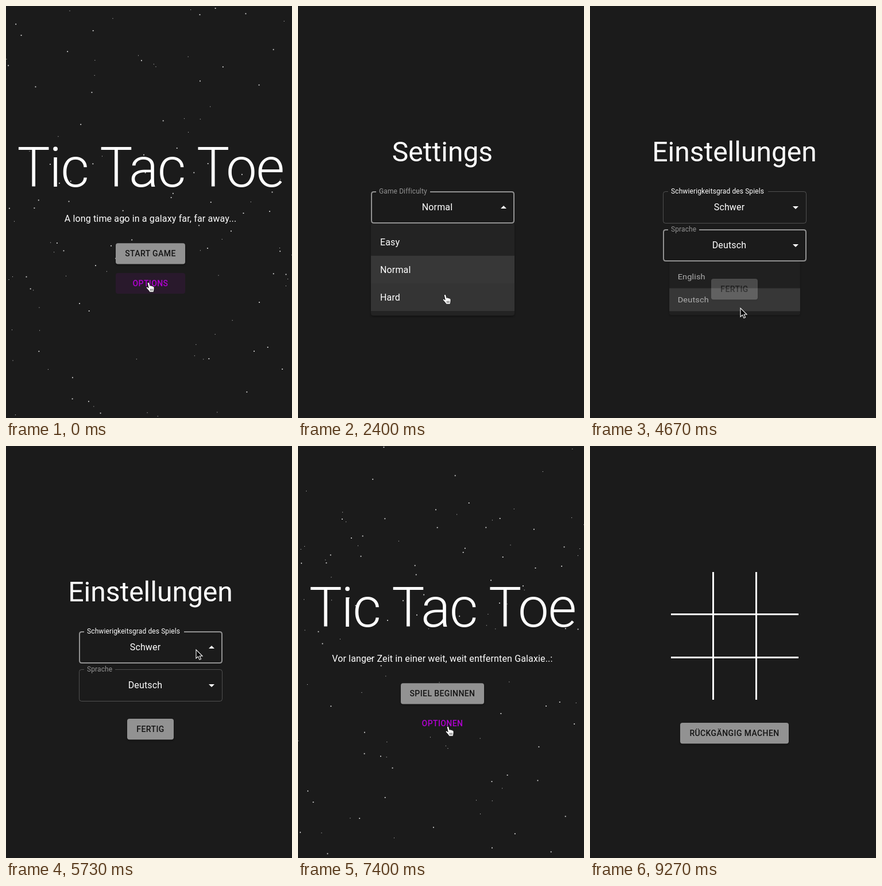
An HTML page that plays this animation: 498 px wide and 716 px high, repeating every 9.79 s.

```html
<!DOCTYPE html>
<html lang="en">
<head>
<meta charset="utf-8">
<title>Tic Tac Toe</title>
<style>
html, body { margin: 0; width: 100%; height: 100%; overflow: hidden; background: #1b1b1b; }
svg { display: block; width: 498px; height: 716px; background: #1b1b1b; }
text { font-family: Roboto, sans-serif; fill: #fff; white-space: pre; }
.mid { text-anchor: middle; }
.h1 { font-size: 96px; font-weight: 300; letter-spacing: -.01562em; }
.h3 { font-size: 48px; }
.body { font-size: 16px; letter-spacing: .00938em; }
.label { font-size: 12px; letter-spacing: .00938em; }
.btn { font-size: 14px; font-weight: 500; letter-spacing: .02857em; }
.raised { filter: drop-shadow(0 2px 1.5px rgba(0, 0, 0, .35)); }
</style>
</head>
<body>
<svg viewBox="0 0 498 716">
  <g id="stars" fill="#d8d8d8"></g>
  <g id="ui"></g>
</svg>
<script>
const LOOP = 9790, W = 498, H = 716, CX = 251.5, GREY = 146;
const SETTINGS = 1000, HOME = 7400, BOARD = 8400;

const WORDS = [{
  tagline: 'A long time ago in a galaxy far, far away...',
  start: ['START GAME', 121], options: 'OPTIONS',
  title: 'Settings', done: ['DONE', 71],
  labels: [['Game Difficulty', 230], ['Language', 199]],
  levels: ['Easy', 'Normal', 'Hard']
}, {
  tagline: 'Vor langer Zeit in einer weit, weit entfernten Galaxie...',
  start: ['SPIEL BEGINNEN', 145], options: 'OPTIONEN',
  title: 'Einstellungen', done: ['FERTIG', 81],
  labels: [['Schwierigkeitsgrad des Spiels', 310], ['Sprache', 190]],
  levels: ['Leicht', 'Normal', 'Schwer']
}];
const LANGUAGES = ['English', 'Deutsch'];
const FIELD_Y = [322, 388];
const MENUS = [
  { field: 0, open: 2000, close: 2800 },
  { field: 1, open: 3930, close: 4600 },
  { field: 0, open: 5730, close: 6470 }
];
// Pointer stops: time, x, y
const PATH = [
  [0, 248, 481], [1130, 248, 481], [1470, 258, 329], [1730, 258, 345],
  [2000, 258, 345], [2400, 256, 502], [2950, 256, 502], [3600, 272, 434],
  [3930, 272, 434], [4400, 262, 525], [5260, 262, 525], [5470, 331, 354],
  [5730, 331, 354], [6130, 443, 237], [6530, 443, 237], [7200, 261, 488],
  [7400, 261, 488], [8100, 271, 440], [8860, 271, 440], [8930, 392, 373]
];
const HAND = 'M-1.6 1.2C-1.6-1 1-1.2 1.6.8L3 5.4C3.6 4.2 5.4 4.5 5.7 5.9C6.5 4.9 8 5.4 8.2 6.8' +
  'C9.2 6.2 10 7 10 8.5V11C10 13 9 14 9 16.2H2C1 13.5-1.5 11.5-3.5 9C-4.5 7.4-2.6 6.4-1 7.8L.2 9Z';
const ARROW = 'M0 0V15L3.5 11.8L6 17.4L8.5 16.3L6.1 11H11Z';

const $ = id => document.getElementById(id);
const clamp = v => Math.max(0, Math.min(1, v));
const ease = v => v * v * (3 - 2 * v);
const inside = (p, x, y, w, h) => p.x >= x && p.x <= x + w && p.y >= y && p.y <= y + h;
const grey = v => { v = Math.round(v); return `rgb(${v},${v},${v})`; };

const text = (s, x, y, cls, fill = '#fff') =>
  `<text x="${x}" y="${y}" class="${cls}" style="fill:${fill}">${s}</text>`;
const rect = (x, y, w, h, fill, r = 0, more = '') =>
  `<rect x="${x}" y="${y}" width="${w}" height="${h}" rx="${r}" fill="${fill}" ${more}/>`;

function makeStars() {
  let seed = 77;
  const rnd = () => (seed = seed * 16807 % 2147483647) / 2147483647;
  const layer = (count, size) => {
    let out = '';
    for (let i = 0; i < count; i++) {
      const x = rnd() * W, y = rnd() * H;
      out += rect(x, y, size, size, '') + rect(x, y + H, size, size, '');
    }
    return `<g>${out.replace(/fill="" /g, '')}</g>`;
  };
  $('stars').innerHTML = layer(52, 1) + layer(68, 1.8);
}

function pointer(t) {
  const i = PATH.findIndex(k => k[0] > t);
  if (i < 0) { const [, x, y] = PATH[PATH.length - 1]; return { x, y }; }
  const [t0, x0, y0] = PATH[i - 1], [t1, x1, y1] = PATH[i];
  const k = ease((t - t0) / (t1 - t0));
  return { x: x0 + (x1 - x0) * k, y: y0 + (y1 - y0) * k };
}

function button(label, w, y, p, live) {
  const x = CX - w / 2, over = inside(p, x, y, w, 36);
  p.hand = p.hand || over;
  return rect(x, y, w, 36.3, over && live ? '#666' : grey(GREY), 4, 'class="raised"') +
    text(label, CX, y + 23, 'btn mid', 'rgba(0,0,0,.87)');
}

function home(t, p, words) {
  const live = t < SETTINGS || t > HOME + 60;
  const [label, w] = words.start, x = CX - w / 2;
  const over = inside(p, x, 464, w, 36);
  p.hand = p.hand || over;
  return text('Tic Tac Toe', CX, 314, 'h1 mid') +
    text(words.tagline, CX, 375, 'body mid') +
    button(label, w, 412.3, p, live) +
    (over && live ? rect(x, 464, w, 36, 'rgba(176,0,208,.09)', 4) : '') +
    text(words.options, CX, 487, 'btn mid', '#b000d0');
}

function field(i, t, p, words, value, menu) {
  const y = FIELD_Y[i], [label, notch] = words.labels[i];
  const last = MENUS.filter(m => m.open <= t).pop();
  const focused = !!last && last.field === i;
  const before = last && MENUS[MENUS.indexOf(last) - 1];
  const was = !!before && before.field === i;
  const blend = last ? clamp((t - last.open) / 200) : 1;
  const tone = on => on ? GREY : 255;
  const over = !menu && inside(p, 127, y, 250, 56);
  p.hand = p.hand || over;

  const lw = focused ? 2 : 1, o = lw / 2, l = 127 + o, r = 377 - o, top = y + o, b = y + 56 - o;
  const stroke = focused ? grey(GREY) : over ? '#fff' : 'rgba(255,255,255,.23)';
  const up = menu && menu.field === i && t < menu.close;
  return `<path d="M${notch} ${top}H${r - 4}Q${r} ${top} ${r} ${top + 4}V${b - 4}Q${r} ${b} ${r - 4} ${b}` +
    `H${l + 4}Q${l} ${b} ${l} ${b - 4}V${top + 4}Q${l} ${top} ${l + 4} ${top}H136" ` +
    `fill="none" stroke="${stroke}" stroke-width="${lw}"/>` +
    text(label, 141, y + 4, 'label', grey(tone(was) + (tone(focused) - tone(was)) * blend)) +
    text(value, 242.5, y + 33, 'body mid') +
    `<path d="M353 ${y + 26}l5 5 5-5z" fill="#fff" ${up ? `transform="rotate(180 358 ${y + 28})"` : ''}/>`;
}

function popup(menu, t, p, items, selected) {
  const y = FIELD_Y[menu.field] + 56, h = items.length * 48 + 16;
  const closing = t >= menu.close;
  const k = closing ? 1 - clamp((t - menu.close) / 200) : ease(clamp((t - menu.open) / 250));
  const s = .75 + .25 * k;
  let out = rect(127, y, 250, h, '#232323', 4, 'class="raised"');
  items.forEach((item, i) => {
    const iy = y + 8 + i * 48, over = inside(p, 127, iy, 250, 48);
    if (over && !closing) p.hand = true;
    if (i === selected) out += rect(127, iy, 250, 48, 'rgba(146,146,146,.18)');
    if (over) out += rect(127, iy, 250, 48, 'rgba(255,255,255,.08)');
    out += text(item, 143, iy + 29.5, 'body');
  });
  return `<g opacity="${k}" transform="translate(252 ${y}) scale(${s} ${s * s}) translate(-252 ${-y})">${out}</g>`;
}

function settings(t, p, words, level, lang) {
  const menu = MENUS.find(m => t >= m.open && t < m.close + 200);
  const [done, w] = words.done;
  let out = text(words.title, CX, 270, 'h3 mid') +
    field(0, t, p, words, words.levels[level], menu) +
    field(1, t, p, words, LANGUAGES[lang], menu) +
    button(done, w, 474, p, t > 1140 && !menu);
  if (menu) {
    p.hand = false;
    out += menu.field ? popup(menu, t, p, LANGUAGES, lang) : popup(menu, t, p, words.levels, level);
  }
  return out;
}

function board(p) {
  p.hand = inside(p, 141, 219, 222, 222);
  return [0, 75].map(d =>
    rect(213 + d, 219, 3, 222, '#fff') + rect(141, 291 + d, 222, 3, '#fff')).join('') +
    button('RÜCKGÄNGIG MACHEN', 189, 481, p, false);
}

function cursor(p) {
  const shape = p.hand
    ? `<path d="${HAND}" fill="#fff" stroke="#111" stroke-width=".9"/>` +
      '<path d="M3.4 10.5V14M5.3 10.5V14M7.2 10.5V14" stroke="#111" stroke-width=".7"/>'
    : `<path d="${ARROW}" fill="#000" stroke="#fff" stroke-width="1.1"/>`;
  return `<g transform="translate(${p.x} ${p.y})">${shape}</g>`;
}

function draw(t) {
  const p = pointer(t);
  const lang = t < 4600 ? 0 : 1, level = t < 2800 ? 1 : 2, words = WORDS[lang];
  const isHome = t < SETTINGS || (t >= HOME && t < BOARD);
  $('stars').style.display = isHome ? '' : 'none';
  [40, 20].forEach((speed, i) =>
    $('stars').children[i].setAttribute('transform', `translate(0 ${-(t * speed / 1000 % H)})`));
  const page = isHome ? home(t, p, words)
    : t < HOME ? settings(t, p, words, level, lang)
    : board(p);
  $('ui').innerHTML = page + (t < 9000 ? cursor(p) : '');
}

makeStars();
const begin = performance.now();
function tick() {
  draw((performance.now() - begin) % LOOP);
  requestAnimationFrame(tick);
}
tick();
</script>
</body>
</html>
```
